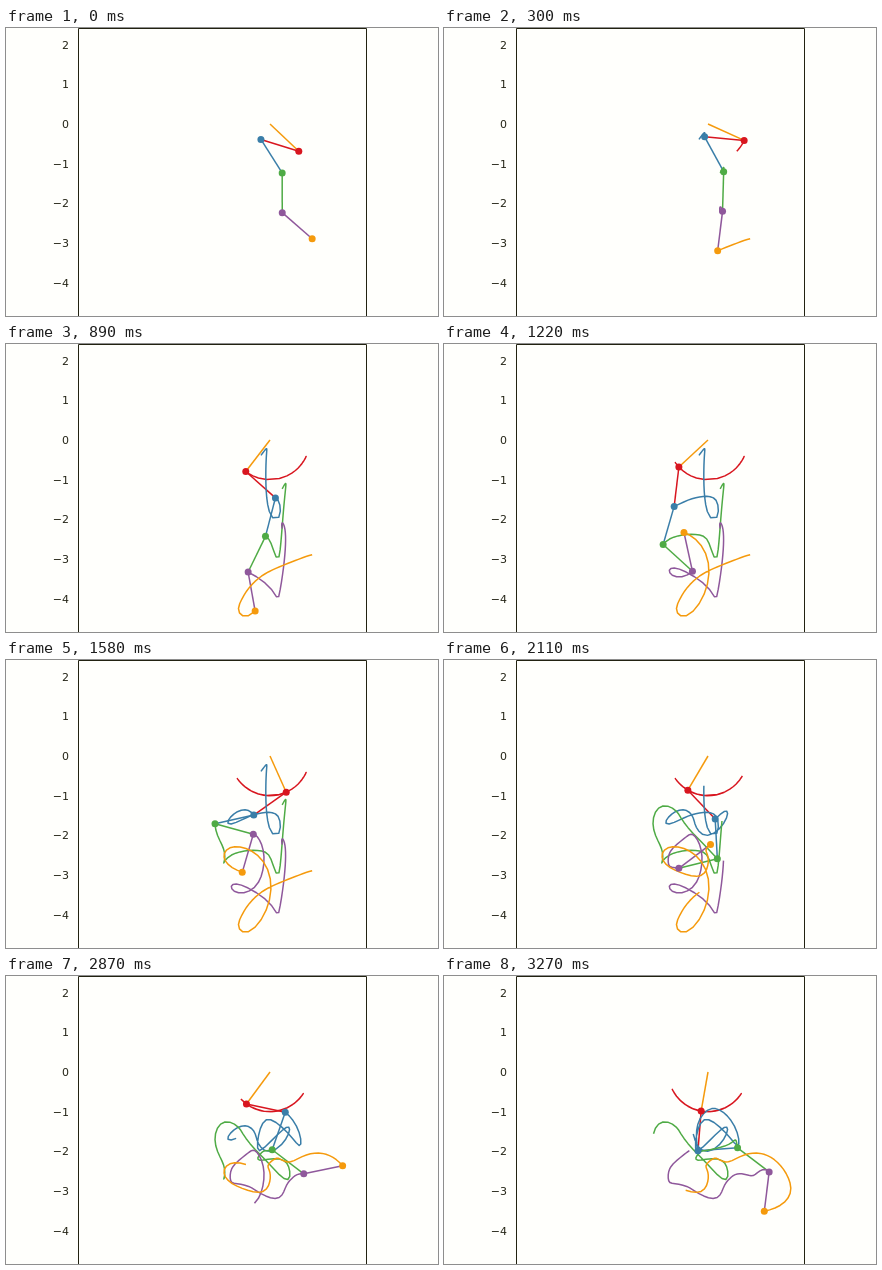
These frames come from a looping animation (432 px wide and 288 px high, 3.31 s). An HTML page with a canvas:

```html
<!DOCTYPE html>
<html lang="en">
<head>
<meta charset="utf-8">
<title>Five-link pendulum</title>
<style>
html, body { margin: 0; width: 100%; height: 100%; overflow: hidden; background: #fffffc; }
canvas { display: block; }
</style>
</head>
<body>
<canvas id="stage" width="432" height="288"></canvas>
<script>
const ctx = document.getElementById('stage').getContext('2d');
const LOOP = 3310, STEPS = 100, TRAIL = 50;
const UNIT = 39.7, PIVOT = [264, 96];
const COLORS = ['#f59a0c', '#d8161f', '#3a7ea8', '#4fab45', '#8f589b', '#f59a0c'];

// Equal masses on unit links; two time nodes per step, 30 steps per second
const LINKS = 5, GRAVITY = 9.81, DT = 1 / 60;
const NODES = 2 * STEPS - 1, SIZE = NODES * LINKS, BAND = 3 * LINKS;
const rad = deg => deg * Math.PI / 180;

// Step, slack in degrees, then the angle of each link from straight down.
// Tight poses are met; loose ones only tell which way the links swing.
const TIGHT = 0.3, LOOSE = 8;
const poses = [
  [0, TIGHT, 47, -108, 32.5, 0, 49],
  [9, TIGHT, 64.7, -94.3, 28.5, -1.5, -7],
  [20, LOOSE, 32, -33, 15, -1, -65],
  [27, TIGHT, -37.7, 48, -14.7, -26, 10],
  [37, LOOSE, -48.5, 10, -12.7, 49, 194],
  [43, LOOSE, -5, -63, -14, 86, 278],
  [48, TIGHT, 24, -54.5, -77, 74, 344],
  [56, LOOSE, -2, 8, -122, -14, 420],
  [64, TIGHT, -30.5, 43, 3, -75.6, 487],
  [70, LOOSE, 17, -38, 53, -53, 496],
  [79, LOOSE, 50, -15, -50, 43, 506],
  [87, TIGHT, -35.7, 77, -18.9, 52.3, 461.6],
  [93, LOOSE, -60, 47, 45, 45, 436],
  [99, TIGHT, -10, -4.4, 94.4, 53, 353]
].map(([step, slack, ...angles]) =>
  ({ node: 2 * step, slack: rad(slack), angles: angles.map(rad) }));

function firstGuess() {
  const q = new Float64Array(SIZE);
  poses.slice(1).forEach((b, i) => {
    const a = poses[i];
    for (let n = a.node; n <= b.node; n++) {
      const u = (n - a.node) / (b.node - a.node);
      for (let k = 0; k < LINKS; k++) {
        q[n * LINKS + k] = a.angles[k] + u * (b.angles[k] - a.angles[k]);
      }
    }
  });
  return q;
}

// Emits each residual, its first variable and its gradient: the miss of every
// pose, then the error in the equation of motion of every link at every node
function residuals(q, weight, emit) {
  for (const { node, slack, angles } of poses) {
    angles.forEach((angle, k) => {
      const at = node * LINKS + k;
      emit((q[at] - angle) / slack, at, [1 / slack]);
    });
  }
  for (let n = 1; n < NODES - 1; n++) {
    for (let k = 0; k < LINKS; k++) {
      const own = q[n * LINKS + k], load = weight * (LINKS - k) * GRAVITY;
      const grad = new Float64Array(BAND);
      let error = load * Math.sin(own);
      grad[LINKS + k] = load * Math.cos(own);
      for (let i = 0; i < BAND; i++) {
        const link = i % LINKS, middle = i - link === LINKS;
        const c = weight * (LINKS - Math.max(k, link)) * (middle ? -2 : 1) / DT ** 2;
        const turn = q[(n - 1) * LINKS + i] - own;
        error += c * Math.sin(turn);
        grad[i] += c * Math.cos(turn);
        grad[LINKS + k] -= c * Math.cos(turn);
      }
      emit(error, (n - 1) * LINKS, grad);
    }
  }
}

function cost(q, weight) {
  let sum = 0;
  residuals(q, weight, r => { sum += r * r; });
  return sum;
}

// Banded Cholesky; H holds row r, column c at r * BAND + r - c
function solve(H, x) {
  const at = (r, c) => r * BAND + r - c;
  for (let r = 0; r < SIZE; r++) {
    const low = Math.max(0, r - BAND + 1);
    for (let c = low; c <= r; c++) {
      let s = H[at(r, c)];
      for (let j = low; j < c; j++) s -= H[at(r, j)] * H[at(c, j)];
      H[at(r, c)] = c === r ? Math.sqrt(s) : s / H[at(c, c)];
    }
    for (let c = low; c < r; c++) x[r] -= H[at(r, c)] * x[c];
    x[r] /= H[at(r, r)];
  }
  for (let r = SIZE - 1; r >= 0; r--) {
    x[r] /= H[at(r, r)];
    for (let c = Math.max(0, r - BAND + 1); c < r; c++) x[c] -= H[at(r, c)] * x[r];
  }
  return x;
}

function newtonStep(q, weight, damping) {
  const H = new Float64Array(SIZE * BAND), x = new Float64Array(SIZE);
  for (let r = 0; r < SIZE; r++) H[r * BAND] = damping;
  residuals(q, weight, (r, first, grad) => {
    for (let a = 0; a < grad.length; a++) {
      x[first + a] -= r * grad[a];
      for (let b = 0; b <= a; b++) H[(first + a) * BAND + a - b] += grad[a] * grad[b];
    }
  });
  solve(H, x);
  return q.map((v, i) => v + x[i]);
}

// Damped least squares, with the laws of motion gradually enforced
function fitMotion() {
  let q = firstGuess(), damping = 10;
  const rounds = 90;
  for (let i = 0; i < rounds; i++) {
    const weight = 0.5 * Math.min(1, 0.004 ** (1 - i / 60));
    const next = newtonStep(q, weight, damping);
    const better = cost(next, weight) < cost(q, weight);
    if (better) q = next;
    damping = better ? Math.max(0.01, damping / 3) : damping * 5;
  }
  return q;
}

const motion = fitMotion();

function joints(step) {
  const points = [PIVOT];
  for (let k = 0; k < LINKS; k++) {
    const [x, y] = points[k], a = motion[2 * step * LINKS + k];
    points.push([x + UNIT * Math.sin(a), y + UNIT * Math.cos(a)]);
  }
  return points;
}

const path = Array.from({ length: STEPS }, (_, step) => joints(step));

function line(points, color) {
  ctx.strokeStyle = color;
  ctx.beginPath();
  points.forEach(p => ctx.lineTo(...p));
  ctx.stroke();
}

function axes() {
  ctx.fillStyle = '#fffffc';
  ctx.fillRect(0, 0, 432, 288);
  ctx.lineWidth = 1;
  line([[72.5, 290], [72.5, 0.5], [360.5, 0.5], [360.5, 290]], '#222211');
  ctx.fillStyle = '#262618';
  ctx.font = '11px "DejaVu Sans", sans-serif';
  ctx.textAlign = 'right';
  for (let n = 2; n >= -4; n--) {
    ctx.fillText(String(n).replace('-', '\u2212'), 63, PIVOT[1] + 4 - n * UNIT);
  }
}

function draw(step) {
  const now = path[step], past = path.slice(Math.max(0, step - TRAIL), step + 1);
  axes();
  ctx.lineWidth = 1.5;
  ctx.lineJoin = 'round';
  for (let k = 0; k <= LINKS; k++) {
    if (k > 0) line(past.map(p => p[k]), COLORS[k]);
    if (k < LINKS) line([now[k], now[k + 1]], COLORS[k]);
  }
  for (let k = 1; k <= LINKS; k++) {
    ctx.fillStyle = COLORS[k];
    ctx.beginPath();
    ctx.arc(...now[k], 3.5, 0, 2 * Math.PI);
    ctx.fill();
  }
}

// Steps last about 33 ms, on a 10 ms clock
function stepAt(ms) {
  const tick = 10 * Math.floor(ms / 10);
  return Math.min(STEPS - 1, Math.ceil((tick + 6.945) / 33.03) - 1);
}

const start = performance.now();
function frame() {
  draw(stepAt((performance.now() - start) % LOOP));
  requestAnimationFrame(frame);
}
frame();
</script>
</body>
</html>
```
